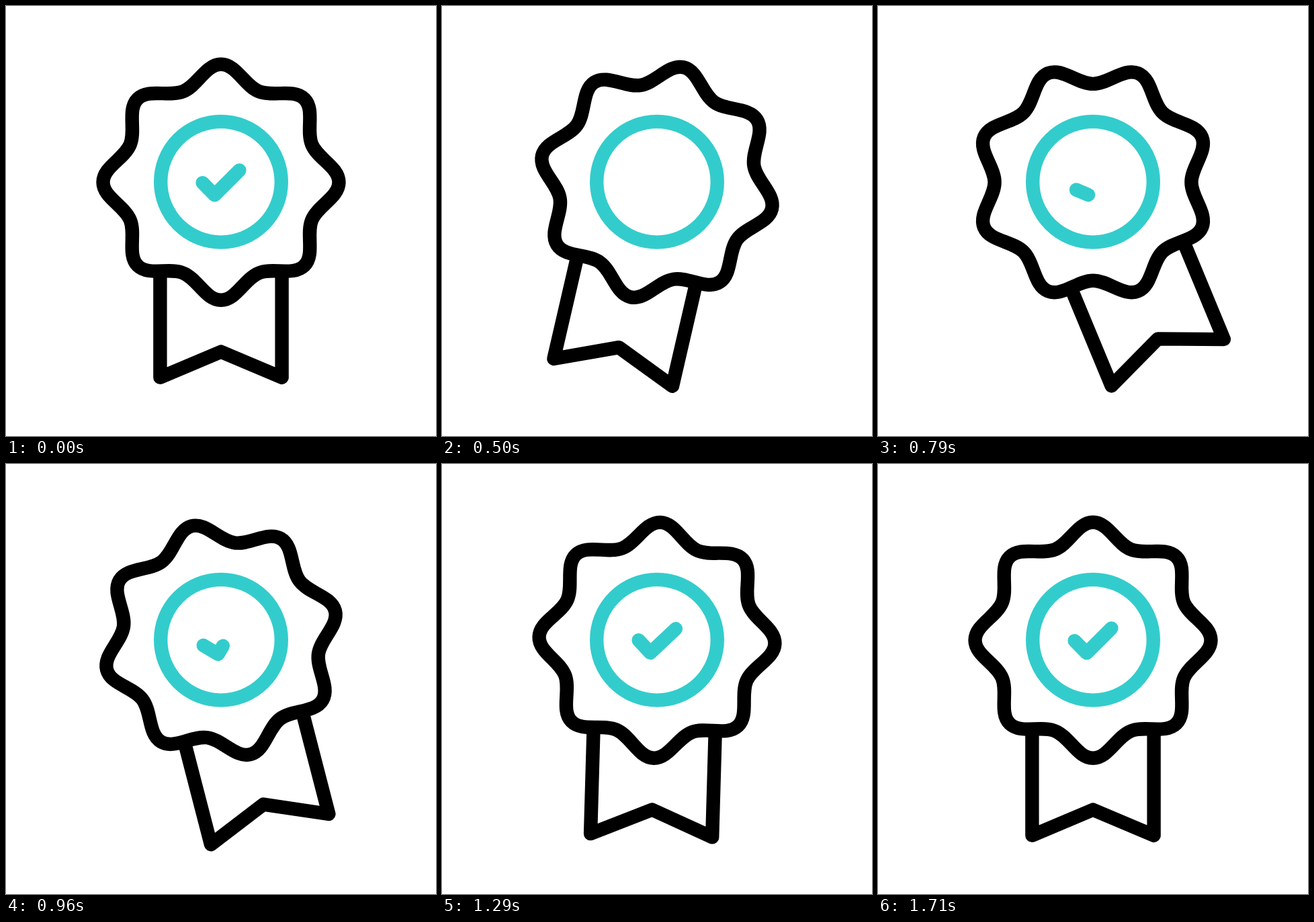
An HTML page with a canvas that plays this animation: 640 by 640 pixels, repeating every 2040 ms.

```html
<!DOCTYPE html>
<html lang="en">
<head>
<meta charset="utf-8">
<title>Award badge</title>
<style>
  html, body { margin: 0; width: 100%; height: 100%; overflow: hidden; background: #fff; }
  canvas { display: block; width: 640px; height: 640px; }
</style>
</head>
<body>
<canvas id="stage" width="640" height="640"></canvas>
<script>
const ctx = document.getElementById('stage').getContext('2d');
const LOOP = 2040;
const STEP = 1000 / 24;
const CENTER = [320, 262.3];
const TEAL = '#33cccc';

// [step, value]
const SWING = [[4, 0], [12, 13], [20, -24.1], [28, 6.3], [34, -3], [41, 0]];
const TRIM = [[2, 1], [8.04, 0], [15.1, 0], [30.5, 1]];

const smooth = u => u * u * (3 - 2 * u);
const linear = u => u;

function valueAt(keys, step, ease) {
  if (step <= keys[0][0]) return keys[0][1];
  for (let i = 1; i < keys.length; i++) {
    const [t0, v0] = keys[i - 1];
    const [t1, v1] = keys[i];
    if (step < t1) return v0 + (v1 - v0) * ease((step - t0) / (t1 - t0));
  }
  return keys[keys.length - 1][1];
}

function buildStar() {
  const path = new Path2D();
  const tip = 175.5, valley = 146.4, tipPull = 22.5, valleyPull = 23;
  // A point at a given radius, moved sideways along its tangent.
  const point = (angle, radius, side = 0) => [
    radius * Math.sin(angle) + side * Math.cos(angle),
    -radius * Math.cos(angle) + side * Math.sin(angle)
  ];
  path.moveTo(...point(0, tip));
  for (let i = 0; i < 8; i++) {
    const a = i * Math.PI / 4, mid = a + Math.PI / 8, next = a + Math.PI / 4;
    path.bezierCurveTo(...point(a, tip, tipPull), ...point(mid, valley, -valleyPull), ...point(mid, valley));
    path.bezierCurveTo(...point(mid, valley, valleyPull), ...point(next, tip, -tipPull), ...point(next, tip));
  }
  path.closePath();
  return path;
}

const star = buildStar();
const ribbon = new Path2D('M-90.6 133V290.6L0 252.3L90.6 290.6V133');
const ring = new Path2D();
ring.arc(0, -0.5, 89.8, 0, Math.PI * 2);

const CHECK = [[-27.4, 0.8], [-9.4, 19], [27.4, -17.8]];

function drawCheck(amount) {
  if (amount <= 0) return;
  const [a, b, c] = CHECK;
  const first = Math.hypot(b[0] - a[0], b[1] - a[1]);
  const second = Math.hypot(c[0] - b[0], c[1] - b[1]);
  const length = amount * (first + second);
  const along = (p, q, u) => [p[0] + (q[0] - p[0]) * u, p[1] + (q[1] - p[1]) * u];
  ctx.beginPath();
  ctx.moveTo(...a);
  ctx.lineTo(...along(a, b, Math.min(1, length / first)));
  if (length > first) ctx.lineTo(...along(b, c, (length - first) / second));
  ctx.stroke();
}

function draw(time) {
  const step = Math.floor((time % LOOP + 5) / STEP);
  ctx.setTransform(1, 0, 0, 1, 0, 0);
  ctx.fillStyle = '#fff';
  ctx.fillRect(0, 0, 640, 640);
  ctx.lineWidth = 20.4;
  ctx.lineCap = 'butt';
  ctx.lineJoin = 'round';
  ctx.translate(...CENTER);

  ctx.strokeStyle = TEAL;
  ctx.stroke(ring);

  ctx.rotate(valueAt(SWING, step, smooth) * Math.PI / 180);
  ctx.strokeStyle = '#000';
  ctx.stroke(ribbon);
  ctx.stroke(star);

  ctx.strokeStyle = TEAL;
  ctx.lineCap = 'round';
  drawCheck(valueAt(TRIM, step, linear));
}

let start = null;
function tick(now) {
  if (start === null) start = now;
  draw(now - start);
  requestAnimationFrame(tick);
}
draw(0);
requestAnimationFrame(tick);
</script>
</body>
</html>
```
